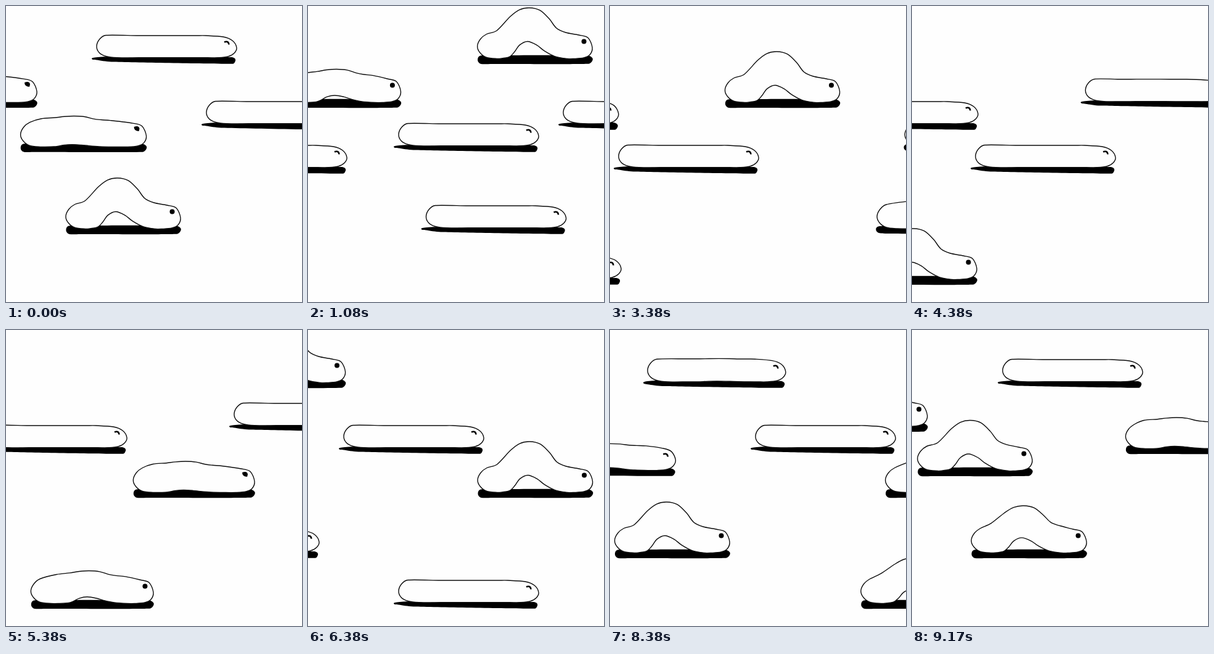
Write an HTML page with a canvas that moves like this. It is 480 by 480 pixels and loops after 9210 ms.

```html
<!DOCTYPE html>
<html lang="en">
<head>
<meta charset="utf-8">
<title>Crawling worms</title>
<style>
  html, body { margin: 0; width: 100%; height: 100%; overflow: hidden; background: #fefefe; }
  canvas { display: block; width: 100vmin; height: 100vmin; }
</style>
</head>
<body>
<canvas width="480" height="480"></canvas>
<script>
const ctx = document.querySelector('canvas').getContext('2d');
const LOOP = 9210, FRAMES = 221, STRIDE = 44.5, LENGTH = 227;

// One stride: phase, tail x, head x, hump x, hump lift, belly lift, flatness
const POSES = [
  [0, 0, 227, 118, 0, 0, 1],
  [.32, 0, 227, 118, 0, 0, 1],
  [.425, 26, 225.5, 121, 13, 9.5, 0],
  [.48, 32, 225, 122.5, 23.5, 18, 0],
  [.59, 38, 225, 123, 37, 24, 0],
  [.69, 39, 225, 123, 44, 28, 0],
  [.815, 38.5, 225, 123, 44, 28, 0],
  [.84, 44.5, 229, 134, 42, 26, 0],
  [.855, 48, 233.5, 134, 38, 22, 0],
  [.895, 56, 239.5, 134.5, 27, 13, 0],
  [.932, 67.5, 250, 149.5, 12, 4, 0],
  [.948, 55, 258, 141, 12, 4, 0],
  [1, 44.5, 271.5, 150, 0, 0, 1]
];

// Rows: top of the flat body, tail x at stride 0, strides at time 0, strides per frame
const WORMS = [
  { top: 47, x: 147, start: .26, rate: .0964 },
  { top: 118, x: -164, start: -.05, rate: .0957 },
  { top: 154, x: 325, start: .02, rate: 19 / FRAMES },
  { top: 190, x: 13.5, start: -.05, rate: .129 },
  { top: 225, x: -164, start: -1.98, rate: 17 / FRAMES },
  { top: 323, x: 58, start: .7, rate: 21 / FRAMES },
  { top: 405, x: -120, start: -11.16, rate: 25 / FRAMES }
];

const mix = (a, b, t) => a + (b - a) * t;

function poseAt(phase) {
  const i = Math.max(1, POSES.findIndex(p => p[0] >= phase));
  const a = POSES[i - 1], b = POSES[i];
  const t = (phase - a[0]) / (b[0] - a[0]);
  return a.map((v, j) => mix(v, b[j], t)).slice(1);
}

// Closed smooth curve through the points
function blob(points) {
  const n = points.length, at = i => points[(i + n) % n];
  ctx.beginPath();
  ctx.moveTo(...points[0]);
  for (let i = 0; i < n; i++) {
    const [a, b, c, d] = [at(i - 1), at(i), at(i + 1), at(i + 2)];
    // Keep handles short next to long straight spans
    const span = Math.hypot(c[0] - b[0], c[1] - b[1]);
    const handle = (p, q) => {
      const dx = q[0] - p[0], dy = q[1] - p[1];
      const k = Math.min(1 / 6, span * .36 / (Math.hypot(dx, dy) || 1));
      return [dx * k, dy * k];
    };
    const u = handle(a, c), v = handle(b, d);
    ctx.bezierCurveTo(b[0] + u[0], b[1] + u[1], c[0] - v[0], c[1] - v[1], c[0], c[1]);
  }
  ctx.closePath();
}

function drawShadow(l, r, flat) {
  const m = (a, b) => mix(a, b, flat);
  blob([
    [m(l + 1, l - 8), m(37, 38)],
    [m(l + 5, l - 3), m(33.5, 36.5)],
    [l + 22, m(33, 35)],
    [r - 8, m(33, 36)],
    [m(r, r - 3), m(37, 38)],
    [m(r, r - 2), 42],
    [r - 6, 46.7],
    [l + 24, m(47, 43.5)],
    [m(l + 6, l), m(47, 40.5)],
    [m(l + 1, l - 6), m(43, 40)]
  ]);
  ctx.fillStyle = '#000';
  ctx.fill();
}

function drawBody(l, r, c, lift, belly, flat) {
  const m = (a, b) => mix(a, b, flat);
  const low = 44 - lift, base = m(38.5, 36.8);
  const slope = m(-1, 2);
  const back = [
    [-53, .16 + .0145 * low], [-31, .68 + .003 * low], [-16, .93],
    [0, 1], [17, .91], [32, .6], [44, .25 + .007 * low], [59, .09 + .009 * low]
  ].map(([dx, k]) => [c + dx, m(0, 1) - lift * k]);
  const under = [
    [62, 0], [41, .14], [24, .46], [12, .79], [-3, 1],
    [-16, .79], [-24, .4], [-33, .1], [-50, 0]
  ].map(([dx, k]) => [c + dx, base - belly * k]);
  blob([
    [l, 18], [l + 5, 6.5], [l + 15, m(-1.5, .5)],
    ...back,
    [r - 22, slope + 1], [r - 7, m(4.5, 9)], [r, 20.5],
    [r - 4, m(32, 29.5)], [r - 14, m(37, 35)], [r - 30, base],
    ...under,
    [l + 33, base], [l + 15, m(36.5, 34.5)], [l + 4, 28.5]
  ]);
  ctx.fillStyle = '#fefefe';
  ctx.fill();
  ctx.strokeStyle = '#0c0c0c';
  ctx.lineWidth = 1.4;
  ctx.stroke();
}

function drawEye(r, phase, flat) {
  ctx.fillStyle = ctx.strokeStyle = '#000';
  ctx.beginPath();
  if (flat > .4) {
    ctx.lineWidth = 2.6;
    ctx.moveTo(r - 20, 11.5);
    ctx.quadraticCurveTo(r - 13, 9, r - 12.5, 15.5);
    ctx.stroke();
  } else if (phase > .935) {
    ctx.moveTo(r - 20, 6);
    ctx.quadraticCurveTo(r - 12, 3, r - 11, 9);
    ctx.lineTo(r - 12, 13);
    ctx.quadraticCurveTo(r - 20, 13, r - 20, 6);
    ctx.fill();
  } else {
    ctx.arc(r - 13.5, 10.5, 4, 0, 7);
    ctx.fill();
  }
}

function drawWorm({ top, x, start, rate }, frame) {
  // Wrap around the moment the worm is mid-stage, so the jump is off stage
  const middle = ((480 - LENGTH) / 2 - x) / STRIDE;
  const first = Math.round((middle - start) / rate - FRAMES / 2);
  const n = first + ((frame - first) % FRAMES + FRAMES) % FRAMES;
  const strides = start + rate * n;
  const whole = Math.floor(strides), phase = strides - whole;
  const origin = x + whole * STRIDE;
  if (origin > 500 || origin < -320) return;
  const [l, r, c, lift, belly, flat] = poseAt(phase);
  ctx.save();
  ctx.translate(origin, top);
  drawShadow(l, r, flat);
  drawBody(l, r, c, lift, belly, flat);
  drawEye(r, phase, flat);
  ctx.restore();
}

function tick() {
  const t = performance.now() % LOOP;
  const frame = Math.min(FRAMES - 1, Math.floor(t * FRAMES / LOOP + .13));
  ctx.fillStyle = '#fefefe';
  ctx.fillRect(0, 0, 480, 480);
  WORMS.forEach(worm => drawWorm(worm, frame));
  requestAnimationFrame(tick);
}
tick();
</script>
</body>
</html>
```
